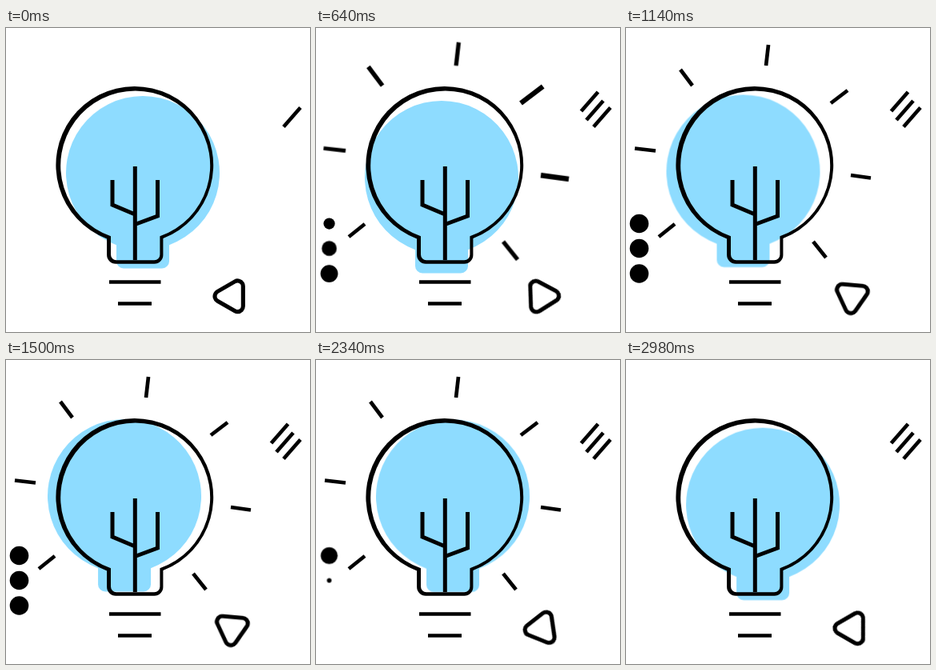
Recreate the animation shown at these times as an HTML page. Size 380 by 380 pixels, loop 3000 ms.

```html
<!DOCTYPE html>
<html lang="en">
<head>
<meta charset="utf-8">
<title>Light bulb</title>
<style>
  html, body { margin: 0; width: 100%; height: 100%; overflow: hidden; background: #fff; }
  svg { display: block; width: 100vw; height: 100vh; }
  .line { fill: none; stroke: #000; stroke-width: 4.7; }
  .wire { fill: none; stroke: #000; stroke-width: 5; }
  #glow { fill: #8edcff; animation: drift 3s linear infinite; }
  #tri { transform-origin: 282.3px 335.3px; animation: turn 3s linear infinite; }
  #tri path { stroke-linejoin: round; }

  @keyframes drift {
    0%, 100% { transform: translate(10px, 9px); }
    10.5% { transform: translate(3.8px, 13.1px); }
    21.33% { transform: translate(-4px, 15px); }
    29.67% { transform: translate(-9.9px, 12.4px); }
    38% { transform: translate(-14.5px, 7.5px); }
    44% { transform: translate(-15px, 2.6px); }
    50% { transform: translate(-13px, -2px); }
    58.33% { transform: translate(-7.2px, -5px); }
    66.67% { transform: translate(0, -6px); }
    72.33% { transform: translate(5.7px, -4.4px); }
    78% { transform: translate(10px, -1.5px); }
    88.83% { transform: translate(11.7px, 4px); }
  }
  @keyframes turn {
    0% { transform: rotate(0deg); }
    10.67% { transform: rotate(-28deg); }
    21.33% { transform: rotate(-62deg); }
    28.67% { transform: rotate(-79deg); }
    38%, 60% { transform: rotate(-85deg); }
    66.67% { transform: rotate(-88.5deg); }
    72.33% { transform: rotate(-103deg); }
    78% { transform: rotate(-128deg); }
    90.67% { transform: rotate(-188deg); }
    95.33% { transform: rotate(-222deg); }
    99.33%, 100% { transform: rotate(-240deg); }
  }
</style>
</head>
<body>
<svg id="stage" viewBox="0 0 380 380">
  <path id="glow"/>
  <path id="shell" fill-rule="evenodd"/>
  <path class="wire" d="M161.3 173V290M133 190V221L161.3 233M189.5 190V235L161.3 245.5"/>
  <path class="line" d="M129 317.5H193.5M140 344.5H182"/>
  <g id="tri">
    <path id="triOuter" stroke="#000" stroke-width="18.7"/>
    <path id="triInner" fill="#fff" stroke="#fff" stroke-width="8.5"/>
  </g>
</svg>
<script>
const LOOP = 3000;
const stage = document.getElementById('stage');
const setPath = (id, d) => document.getElementById(id).setAttribute('d', d);

function add(tag, attrs) {
  const el = document.createElementNS('http://www.w3.org/2000/svg', tag);
  for (const k in attrs) el.setAttribute(k, attrs[k]);
  return stage.appendChild(el);
}

// steps: [time in ms, scale, easing towards the next step]
function scaleLoop(el, x, y, steps) {
  el.style.transformOrigin = `${x}px ${y}px`;
  el.animate(steps.map(([t, s, easing = 'linear']) =>
    ({ offset: t / LOOP, transform: `scale(${s})`, easing })),
    { duration: LOOP, iterations: Infinity });
}

// Round head with a neck from x0 to x1 that ends at y = base
function bulb(cx, cy, r, x0, x1, base, c) {
  const joint = x => cy + Math.sqrt(r * r - (x - cx) ** 2);
  return `M${x0} ${joint(x0)}A${r} ${r} 0 1 1 ${x1} ${joint(x1)}V${base - c}` +
    `A${c} ${c} 0 0 1 ${x1 - c} ${base}H${x0 + c}A${c} ${c} 0 0 1 ${x0} ${base - c}Z`;
}

setPath('glow', bulb(161, 172, 96, 128, 194, 291.5, 9));
setPath('shell', bulb(160.8, 171.3, 98.4, 126.1, 196.4, 294.8, 11) +
  bulb(161.7, 171.9, 93.5, 131, 192.4, 290.2, 7));

const corners = [180, 300, 60].map(a => {
  const rad = a * Math.PI / 180;
  return `${282.3 + 14.5 * Math.cos(rad)} ${335.3 + 14.5 * Math.sin(rad)}`;
});
for (const id of ['triOuter', 'triInner']) setPath(id, `M${corners.join('L')}Z`);

// Rays, clockwise: inner end, outer end, overshoot
[
  [61, 245, 41, 261, 1.4],
  [37, 153.5, 11, 150.5, 1.3],
  [83, 72, 68, 52, 1.45],
  [175, 47, 178, 21, 1.2],
  [256, 94, 277, 78, 1.4],
  [281, 184, 306, 187.5, 1.4],
  [234, 267, 250, 287, 1.4]
].forEach(([x1, y1, x2, y2, peak], i) => {
  const top = 390 + i * 50, out = 2360 + i * 20;
  scaleLoop(add('line', { class: 'line', x1, y1, x2, y2 }), x1, y1, [
    [0, 0], [top - 250, 0], [top, peak], [top + 250, 1],
    [out, 1], [out + 200, 0], [LOOP, 0]
  ]);
});

// Dots, bottom to top
[307, 275.5, 244.5].forEach((cy, i) => {
  const start = 155 + i * 75, out = 1850 + i * 195;
  scaleLoop(add('circle', { cx: 16.5, cy, r: 11.8 }), 16.5, cy, [
    [0, 0], [start, 0, 'ease-in-out'], [start + 600, 1],
    [out, 1, 'ease-in-out'], [out + 450, 0], [LOOP, 0]
  ]);
});

// Slanted strokes; the first one stays
[[347, 123.5], [338, 115], [331.5, 104]].forEach(([x1, y1], i) => {
  const el = add('line', { class: 'line', x1, y1, x2: x1 + 21, y2: y1 - 24 });
  if (!i) return;
  const start = i * 200 - 50;
  scaleLoop(el, x1, y1, [
    [0, 0], [start, 0, 'ease-out'], [start + 260, 1], [LOOP, 1]
  ]);
});
</script>
</body>
</html>
```
